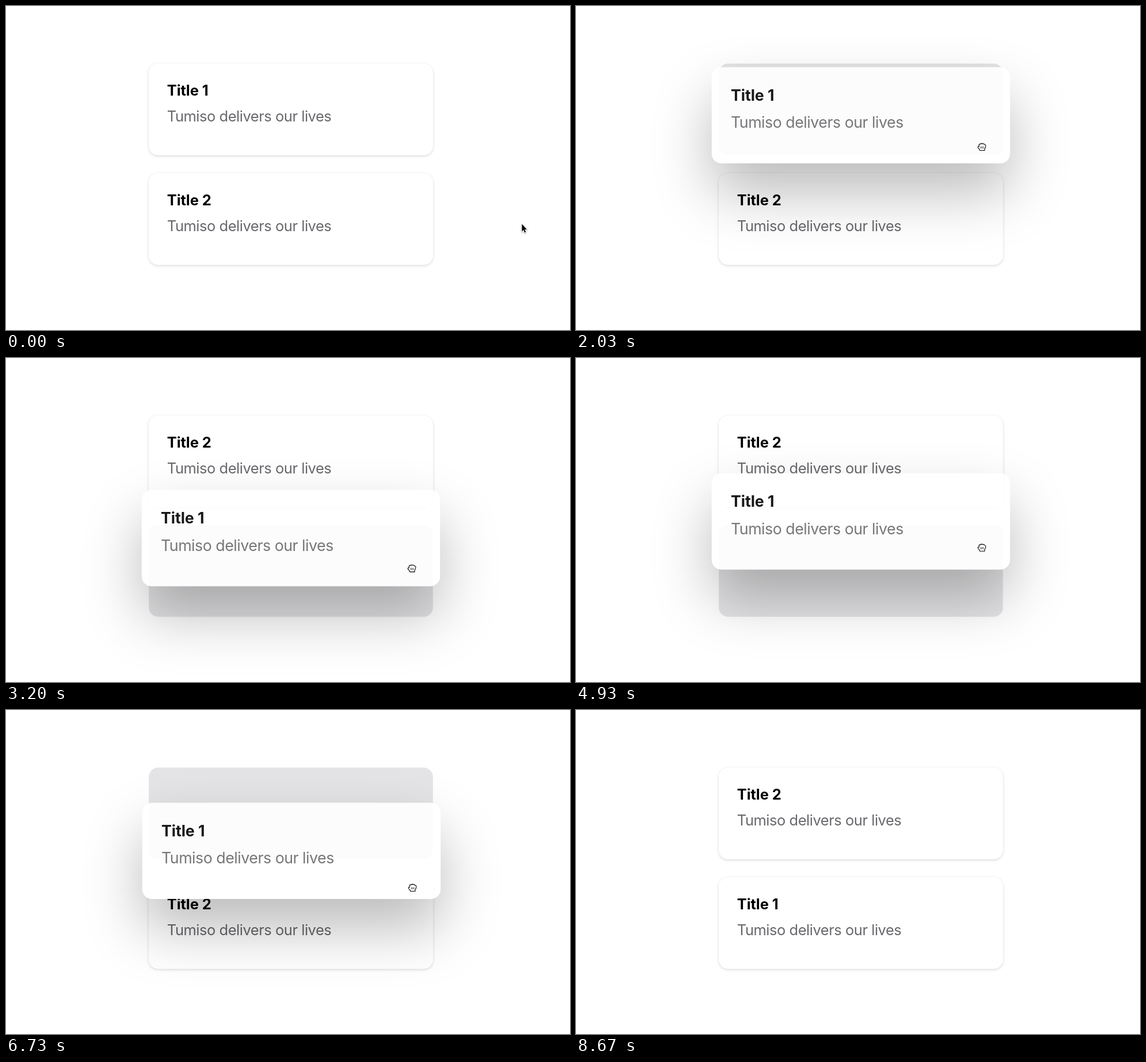
Write an HTML page with a canvas that moves like this. It is 980 px wide and 564 px high and loops after 9.83 s.

```html
<!DOCTYPE html>
<html lang="en">
<head>
<meta charset="utf-8">
<title>Sortable cards</title>
<style>
  html, body { margin: 0; width: 100%; height: 100%; overflow: hidden; background: #fff; }
  canvas { display: block; width: 980px; height: 564px; }
</style>
</head>
<body>
<canvas id="stage" width="980" height="564"></canvas>
<script>
const ctx = document.getElementById('stage').getContext('2d');
const LOOP = 9830;
const CARD = { x: 248.2, y: 100.2, w: 493.6, h: 159.4, r: 16 };
const STEP = 190.8;                    // distance between the two slots
const GRAB = 1000, DROP = 8100, DROP_MS = 250;
const SWAPS = [2815, 4995, 6790];      // cards change places
const LAG = 33;                        // the dragged card trails the pointer
const HOME = { x: 705, y: 232 };

// Pointer path: time, x, y
const PATH = [
  [0, 896, 379], [400, 705, 232], [1830, 705, 232], [2030, 705, 245],
  [2800, 705, 333], [3200, 705, 366], [4700, 705, 366], [4860, 705, 344],
  [4930, 705, 330], [5100, 705, 300], [5530, 706, 260], [6530, 706, 260],
  [6850, 706, 345], [7100, 707, 385], [7470, 708, 397], [8180, 708, 397],
  [8640, 966, 500]
];

const ARROW = new Path2D('M.5.6V13.4L3.3 10.8L5.3 15.6L7.3 14.7L5.3 10H9Z');
const FIST = new Path2D('M-4.6-.6L-4.8-3.4Q-4.4-5.2-2.6-4.4Q-2.2-6.8-.2-5Q1-7 2.4-4.8Q4.4-6 4.8-3.8Q7-4 6.9-1.4Q6.8 1.4 5 3.6V6.4H-3.4L-3.8 4.4Q-6.4 2.4-6.8.4Q-6.6-1.2-4.6-.6Z');
const CREASES = new Path2D('M-1.5-.6V3M.7-.6V3M2.9-.6V3');
const PALM = new Path2D('M-3.5 2.4L-6.8-.8Q-8-2.6-6.4-3L-4-1.2L-5.2-5.4Q-5-7.4-3.4-6.4L-2-3L-1.6-7.4Q-.4-9 .6-7.4L.8-3L2.2-7Q3.6-8 4.2-6.4L3.6-2L5.6-4.6Q7.6-5 7-3Q5.5.4 5.4 3L4.6 7.6H-2.6Z');

const clamp = v => Math.min(1, Math.max(0, v));
const mix = (a, b, k) => a + (b - a) * k;

// CSS "ease": cubic-bezier(.25, .1, .25, 1)
function ease(p) {
  p = clamp(p);
  const curve = (a, b, u) => 3 * a * u * (1 - u) ** 2 + 3 * b * u * u * (1 - u) + u ** 3;
  let lo = 0, hi = 1;
  for (let i = 0; i < 20; i++) {
    const mid = (lo + hi) / 2;
    if (curve(.25, .25, mid) < p) lo = mid; else hi = mid;
  }
  return curve(.1, 1, lo);
}

// Monotone cubic interpolation along PATH
function along(t, axis) {
  const last = PATH.length - 1;
  if (t <= PATH[0][0]) return PATH[0][axis];
  if (t >= PATH[last][0]) return PATH[last][axis];
  const i = PATH.findIndex(p => p[0] > t) - 1;
  const rate = n => (PATH[n + 1][axis] - PATH[n][axis]) / (PATH[n + 1][0] - PATH[n][0]);
  const slope = n => {
    if (n === 0 || n === last) return 0;
    const a = rate(n - 1), b = rate(n);
    return a * b > 0 ? 2 * a * b / (a + b) : 0;
  };
  const span = PATH[i + 1][0] - PATH[i][0];
  const u = (t - PATH[i][0]) / span, v = 1 - u;
  return PATH[i][axis] * (1 + 2 * u) * v * v + slope(i) * span * u * v * v
    + PATH[i + 1][axis] * u * u * (3 - 2 * u) - slope(i + 1) * span * u * u * v;
}
const pointerAt = t => ({ x: along(t, 1), y: along(t, 2) });

function box(x, y, w, h, r) {
  const p = new Path2D();
  p.roundRect(x, y, w, h, r);
  return p;
}

// Shadow outside the box only, as CSS box-shadow paints it
function shadow(x, y, w, h, r, dy, blur, alpha) {
  if (alpha <= 0) return;
  const far = 2000;
  const outside = box(x, y, w, h, r);
  outside.rect(-100, -100, 1200, 800);
  ctx.save();
  ctx.clip(outside, 'evenodd');
  ctx.shadowColor = `rgba(0,0,0,${alpha})`;
  ctx.shadowBlur = blur;
  ctx.shadowOffsetX = far;
  ctx.shadowOffsetY = dy;
  ctx.fillStyle = '#000';
  ctx.fill(box(x - far, y, w, h, r));
  ctx.restore();
}

function label(text, y, weight, color, spacing) {
  ctx.font = `${weight} 25.5px Inter, "Noto Sans", sans-serif`;
  ctx.letterSpacing = spacing + 'px';
  ctx.fillStyle = color;
  ctx.fillText(text, 31.6, y);
}

// lift: 0 lies flat in the list, 1 is fully raised
function card(title, dx, dy, lift = 0) {
  const s = 1 + .05 * lift;
  const w = CARD.w * s, h = CARD.h * s, r = CARD.r * s;
  const x = CARD.x + dx - (w - CARD.w) / 2;
  const y = CARD.y + dy - (h - CARD.h) / 2;
  const opacity = 1 - .1 * lift;
  shadow(x, y, w, h, r, 1.6, 4.8, .16 * (1 - lift));
  shadow(x, y, w, h, r, 50, 100, .3 * lift * opacity);
  ctx.save();
  ctx.globalAlpha = opacity;
  ctx.fillStyle = '#fff';
  ctx.fill(box(x, y, w, h, r));
  ctx.translate(x, y);
  ctx.scale(s, s);
  label(title, 55.8, 700, '#000', -.1);
  label('Tumiso delivers our lives', 100.8, 400, '#68686c', -.48);
  ctx.restore();
}

function placeholder(dy, alpha) {
  ctx.save();
  ctx.globalAlpha = alpha;
  ctx.fillStyle = '#e4e4e6';
  ctx.fill(box(CARD.x, CARD.y + dy, CARD.w, CARD.h, CARD.r));
  ctx.restore();
}

function cursor(t) {
  if (t > 8650) return;
  const p = pointerAt(t);
  const held = t >= GRAB && t < DROP;
  const over = p.x > CARD.x && p.x < CARD.x + CARD.w;
  ctx.save();
  ctx.translate(p.x, p.y);
  ctx.lineJoin = 'round';
  if (over) {
    const hand = held ? FIST : PALM;
    ctx.fillStyle = '#fff';
    ctx.strokeStyle = '#000';
    ctx.lineWidth = 1.1;
    ctx.fill(hand);
    ctx.stroke(hand);
    if (held) {
      ctx.lineWidth = .8;
      ctx.stroke(CREASES);
    }
  } else {
    ctx.shadowColor = 'rgba(0,0,0,.35)';
    ctx.shadowBlur = 3;
    ctx.shadowOffsetY = 1;
    ctx.strokeStyle = '#fff';
    ctx.lineWidth = 2;
    ctx.stroke(ARROW);
    ctx.shadowColor = 'transparent';
    ctx.fillStyle = '#000';
    ctx.fill(ARROW);
  }
  ctx.restore();
}

function draw(t) {
  ctx.fillStyle = '#fff';
  ctx.fillRect(0, 0, 980, 564);

  const swaps = SWAPS.filter(s => t >= s).length;
  const slot = swaps % 2 * STEP;
  const moved = SWAPS.reduce((sum, s, i) => sum + ease((t - s) / 200) * (i % 2 ? -1 : 1), 0);
  const dragging = t >= GRAB && t < DROP + DROP_MS;

  const back = ease((t - DROP) / DROP_MS);
  const lift = ease((t - GRAB) / 200) * (1 - back);

  if (dragging) placeholder(slot, lift);
  else card('Title 1', 0, slot);
  card('Title 2', 0, STEP * (1 - moved));
  if (dragging) {
    const p = pointerAt(Math.min(t, DROP) - LAG);
    card('Title 1', mix(p.x - HOME.x, 0, back), mix(p.y - HOME.y, slot, back), lift);
  }
  cursor(t);
}

const start = performance.now();
function tick() {
  draw((performance.now() - start) % LOOP);
  requestAnimationFrame(tick);
}
tick();
</script>
</body>
</html>
```
